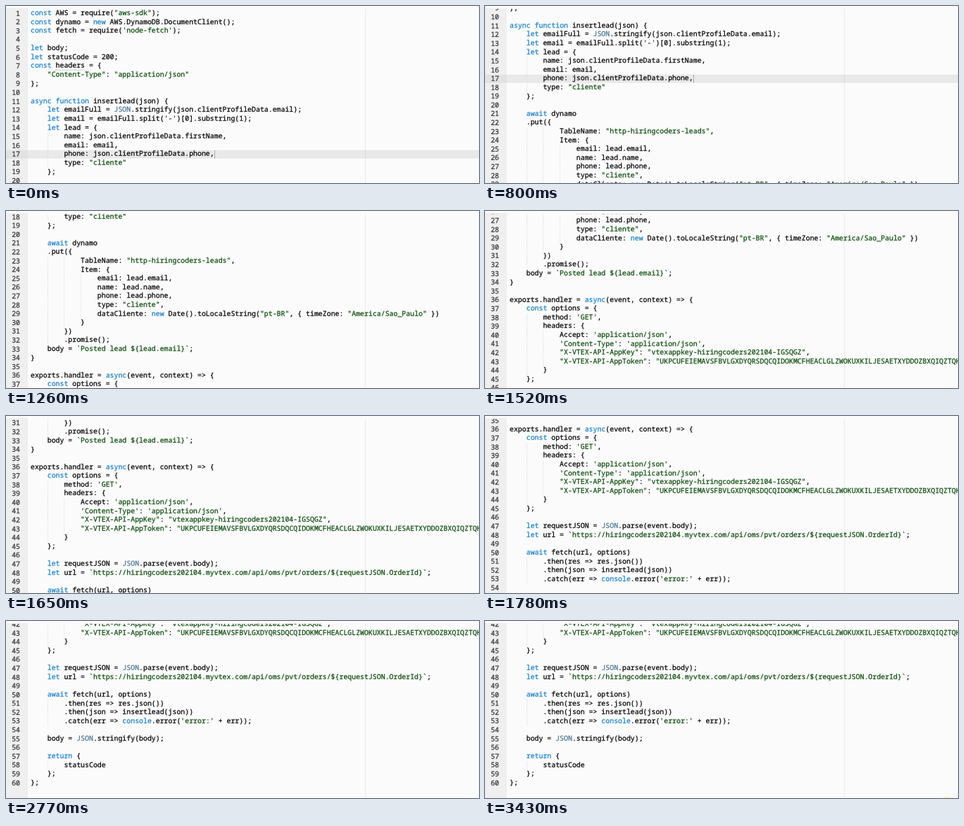
Recreate the animation shown at these times as an HTML page. Size 672 px wide and 253 px high, loop 3.56 s.

```html
<!DOCTYPE html>
<html lang="en">
<head>
<meta charset="utf-8">
<title>Editor scroll</title>
<style>
  html, body { margin: 0; width: 100%; height: 100%; overflow: hidden; background: #fbfbfb; }
  #stage { position: relative; width: 672px; height: 253px; overflow: hidden; background: #fbfbfb; }
  #stage div, pre { position: absolute; margin: 0; }
  #gutter { left: 0; top: 3px; width: 31px; height: 250px; background: #efefef; }
  #margin { left: 510px; top: 4px; width: 1px; height: 249px; background: #ebebeb; }
  #view { left: 0; top: 4px; width: 672px; height: 249px; overflow: hidden; }
  #page { left: 0; top: 0; width: 672px; height: 760px; }
  #active { left: 0; width: 672px; height: 12px; background: linear-gradient(90deg, #e2e2e2 31px, rgba(0, 0, 0, .07) 31px); }
  #caret { width: 1px; height: 12px; background: #a4a4c4; }
  #hint { height: 0; border-bottom: 1px dotted #aaa; }
  .guide { width: 1px; height: 12.6px; background: repeating-linear-gradient(#dcdcdc 0 1px, transparent 1px 2px); }
  pre {
    color: #000; white-space: pre;
    font: 9.9px/12.6px "Noto Sans Mono", "DejaVu Sans Mono", monospace;
    font-variant-ligatures: none; text-rendering: geometricPrecision;
    -webkit-text-stroke: 0.25px;
  }
  #nums { left: 0; top: -0.4px; width: 20px; text-align: right; color: #333; }
  #code { left: 35px; top: -1.1px; }
  .k { color: #1a7fc4; }
  .c { color: #4a7590; }
  .s { color: #0c4a0c; }
  #glow { left: 651px; top: 252px; width: 10px; height: 1px; background: #f8f48c; opacity: 0; }
</style>
</head>
<body>
<div id="stage">
  <div id="gutter"></div>
  <div id="margin"></div>
  <div id="view">
    <div id="page">
      <div id="active"></div>
      <pre id="nums"></pre>
<pre id="code">const AWS = require("aws-sdk");
const dynamo = new AWS.DynamoDB.DocumentClient();
const fetch = require('node-fetch');

let body;
let statusCode = 200;
const headers = {
    "Content-Type": "application/json"
};

async function insertlead(json) {
    let emailFull = JSON.stringify(json.clientProfileData.email);
    let email = emailFull.split('-')[0].substring(1);
    let lead = {
        name: json.clientProfileData.firstName,
        email: email,
        phone: json.clientProfileData.phone,
        type: "cliente"
    };

    await dynamo
    .put({
            TableName: "http-hiringcoders-leads",
            Item: {
                email: lead.email,
                name: lead.name,
                phone: lead.phone,
                type: "cliente",
                dataCliente: new Date().toLocaleString("pt-BR", { timeZone: "America/Sao_Paulo" })
            }
        })
        .promise();
    body = `Posted lead ${lead.email}`;
}

exports.handler = async(event, context) => {
    const options = {
        method: 'GET',
        headers: {
            Accept: 'application/json',
            'Content-Type': 'application/json',
            "X-VTEX-API-AppKey": "vtexappkey-hiringcoders202104-IGSQGZ",
            "X-VTEX-API-AppToken": "UKPCUFEIEMAVSFBVLGXDYQRSDQCQIDOKMCFHEACLGLZWOKUXKILJESAETXYDDOZBXQIQZTQH"
        }
    };

    let requestJSON = JSON.parse(event.body);
    let url = `https://hiringcoders202104.myvtex.com/api/oms/pvt/orders/${requestJSON.OrderId}`;

    await fetch(url, options)
        .then(res => res.json())
        .then(json => insertlead(json))
        .catch(err => console.error('error:' + err));

    body = JSON.stringify(body);

    return {
        statusCode
    };
};</pre>
    </div>
  </div>
  <div id="glow"></div>
</div>
<script>
  const LOOP = 3560, ROW = 12.6, COL = 5.94, LEFT = 34.8;
  const $ = id => document.getElementById(id);
  const place = (el, col, row) => {
    if (col !== null) el.style.left = LEFT + col * COL + 'px';
    el.style.top = row * ROW + 0.3 + 'px';
  };

  const code = $('code');
  const lines = code.textContent.split('\n');
  $('nums').textContent = lines.map((_, i) => i + 1).join('\n');

  // Indent guides: one per full indent level before the last
  lines.forEach((line, row) => {
    const indent = line.search(/\S/);
    for (let col = 4; col < indent; col += 4) {
      const guide = document.createElement('div');
      guide.className = 'guide';
      place(guide, col, row);
      $('page').insertBefore(guide, $('nums'));
    }
  });

  // Syntax colours
  const escape = s => s.replace(/&/g, '&amp;').replace(/</g, '&lt;');
  const span = (type, s) => `<span class="${type}">${s}</span>`;
  const token = /("[^"\n]*"|'[^'\n]*'|`[^`]*`)|\b(const|let|new|async|function|await|return|console)\b|\b(JSON)\b/g;
  code.innerHTML = escape(code.textContent).replace(token, (all, str, key) =>
    span(str ? 's' : key ? 'k' : 'c', all));

  const addMark = (id, col, row) => {
    const el = document.createElement('div');
    el.id = id;
    place(el, col, row);
    $('page').append(el);
    return el;
  };
  place($('active'), null, 16);
  addMark('caret', 44, 16);
  const hint = addMark('hint', 6, 6);
  hint.style.width = 7 * COL + 'px';
  hint.style.marginTop = '11px';

  // [time, scroll offset]
  const scroll = [
    [0, 0], [800, 108], [990, 162], [1260, 216], [1390, 270], [1520, 324],
    [1650, 378], [1780, 432], [2240, 486], [2770, 522], [LOOP, 522]
  ];
  const play = (el, steps, frame) => el.animate(
    steps.map(([t, v]) => ({ offset: t / LOOP, easing: 'step-end', ...frame(v) })),
    { duration: LOOP, iterations: Infinity });
  play($('page'), scroll, y => ({ transform: `translateY(${-y}px)` }));
  play($('glow'), [[0, 0], [3430, 1], [LOOP, 1]], v => ({ opacity: v }));
</script>
</body>
</html>
```
